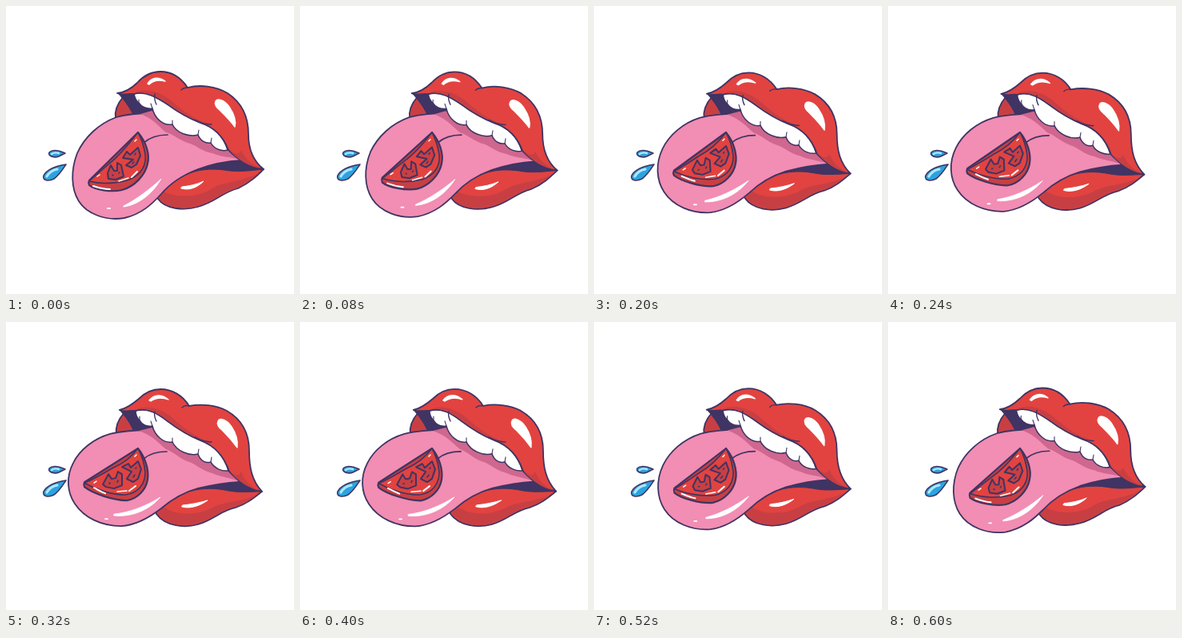
Recreate the animation shown at these times as an HTML page. Size 360 by 360 pixels, loop 0.64 s.

```html
<!DOCTYPE html>
<html lang="en">
<head>
<meta charset="utf-8">
<title>Lips and tomato</title>
<style>
html, body { margin: 0; width: 100%; height: 100%; overflow: hidden; background: #fff; }
svg { display: block; width: 100vw; height: 100vh; }
path { stroke-linecap: round; stroke-linejoin: round; }
</style>
</head>
<body>
<svg id="stage" viewBox="0 0 360 360"></svg>
<script>
const RED = '#e24340', SHADE = '#c83f43', PINK = '#f28db3', DUSK = '#cf678f';
const NAVY = '#3f3463', WHITE = '#fff', BLUE = '#2ba3e0', SKY = '#b4e6f8';
const stage = document.getElementById('stage');
const moving = [];

// A shape with two poses blends between them; with one it stays still.
function shape(fill, stroke, width, from, to) {
  const path = document.createElementNS('http://www.w3.org/2000/svg', 'path');
  path.setAttribute('fill', fill);
  path.setAttribute('stroke', stroke);
  path.setAttribute('stroke-width', width);
  path.setAttribute('d', from);
  stage.append(path);
  if (to) moving.push({ path, from, to: to.match(/[\d.]+/g).map(Number) });
}
const filled = (fill, a, b) => shape(fill, 'none', 0, a, b);
const inked = (fill, a, b, width = 1.8) => shape(fill, NAVY, width, a, b);
const line = (color, width, a, b) => shape('none', color, width, a, b);

// Lower lip
inked(SHADE,
  'M147 113C140 121 135 130 137 141L180 160L180 120Z',
  'M148 113C141 121 136 130 138 141L180 160L180 120Z');
inked(RED,
  'M180 200L190 241C199 254 222 256 240 251C262 245 270 233 290 228C305 221 314 212 322 204L235 195Z',
  'M180 200L188 240C199 255 222 258 240 253C260 247 268 236 287 232C302 227 311 219 320 212L235 197Z');
filled(SHADE,
  'M191 240C200 253 222 255 240 250C262 244 270 232 290 227C302 221 308 216 314 210C290 221 271 219 256 229C240 239 213 240 197 232Z',
  'M189 239C200 254 222 257 240 252C260 246 268 235 287 231C299 227 306 222 312 217C290 226 270 224 256 233C237 242 213 242 197 231Z');
shape(WHITE, WHITE, 1,
  'M219 228C229 231 239 227 247 219C239 223 229 225 220 226Z',
  'M220 231C230 234 242 230 252 223C242 226 231 228 221 229Z');

// Mouth opening
inked(NAVY,
  'M140 109L162 109L190 134L160 138C156 129 150 120 140 109Z',
  'M142 110L164 110L190 135L160 138C157 129 151 120 142 110Z', 1);
inked(NAVY,
  'M225 211L275 187L295 192L322 204C303 206 289 208 273 205C256 203 240 204 225 211Z',
  'M225 213L275 192L294 199L320 212C303 212 290 214 273 210C257 207 240 208 225 213Z', 1);

// Tongue
inked(PINK,
  'M184 134C170 134 152 135 138 139C116 147 98 164 89 184C81 205 81 228 91 244C101 260 125 269 148 265C170 260 183 247 194 235C205 222 219 212 240 204C257 198 276 194 294 193L270 170Z',
  'M184 135C165 135 146 136 130 140C109 146 92 160 84 176C75 193 76 212 86 227C98 245 120 255 144 255C163 254 181 243 194 233C207 222 222 213 240 208C257 204 276 201 292 200L270 174Z');
filled(DUSK,
  'M182 131L230 152L278 178L293 192C279 188 269 189 258 184C245 182 239 175 230 172C218 169 209 160 200 158C191 151 186 142 168 135Z',
  'M182 132L230 155L278 183L291 199C278 194 269 194 258 189C245 186 238 178 229 175C217 171 209 162 200 159C191 152 184 142 166 136Z');
line(NAVY, 1.7, 'M172 171C179 165 189 161 202 161', 'M172 171C179 165 189 162 201 162');
shape(WHITE, WHITE, 0.8,
  'M147 251C165 249 183 235 194 216C180 229 164 241 147 250Z',
  'M135 242C156 244 178 236 193 219C175 230 155 238 135 240Z');
line(WHITE, 1.8, 'M127 253L130 253', 'M124 246L127 246');

// Teeth
inked(WHITE,
  'M160 110C175 105 188 114 202 123C214 132 228 140 243 146C262 152 272 164 277 180C270 182 260 179 256 171C250 172 243 169 240 161C229 164 213 159 208 148C197 150 186 141 183 128C176 129 169 126 166 121C163 119 161 115 160 110Z',
  'M162 111C177 106 189 114 202 124C214 133 228 142 243 148C262 155 273 169 278 186C270 187 260 183 256 175C250 177 243 174 240 165C229 168 213 161 208 150C197 152 186 142 183 130C176 131 170 128 167 123C164 120 162 116 162 111Z', 1.5);
line(NAVY, 1.1,
  'M166 121L166 117M183 128L181 122M208 148L208 143M240 161L241 155M256 171L257 165',
  'M167 123L167 118M183 130L181 124M208 150L208 145M240 165L241 159M256 175L257 169');

// Upper lip
inked(RED,
  'M139 109C149 108 157 103 164 96C173 86 183 82 193 82C207 82 219 90 227 102C242 98 262 100 277 109C295 121 303 139 303 160C303 178 308 193 322 204C306 202 291 193 278 180C272 164 262 152 243 146C228 140 214 132 202 123C188 114 175 106 160 110C153 109 147 112 139 109Z',
  'M142 110C151 108 159 102 166 96C175 87 184 84 193 84C208 84 221 92 229 105C244 102 263 104 276 111C295 122 304 140 304 161C304 181 307 198 320 212C305 209 291 200 279 187C273 169 262 155 243 148C228 142 214 133 202 124C189 114 177 107 162 111C155 110 149 113 142 110Z');
filled(SHADE,
  'M158 109C174 102 190 106 205 117C220 130 238 144 257 148L255 150L243 145C228 139 214 131 202 122C188 113 174 105 158 109Z',
  'M160 110C176 103 191 107 206 118C221 131 238 146 257 150L255 152L243 147C228 141 214 132 202 123C189 113 176 106 160 110Z');
filled(SHADE,
  'M279 180C287 185 291 187 294 180C298 190 307 198 319 203C304 201 291 193 279 180Z',
  'M280 187C287 192 291 194 294 187C298 198 306 206 317 211C304 208 291 200 280 187Z');
line(NAVY, 1.4,
  'M227 102C223 102 221 103 219 105M186 110C185 115 186 119 188 123M236 142C243 146 250 148 257 148',
  'M229 105C225 104 222 105 220 107M186 112C185 116 186 120 188 124M236 144C243 148 250 150 257 150');
shape(WHITE, WHITE, 1.4,
  'M177 97C182 89 191 88 199 94C191 92 184 93 179 98Z',
  'M179 98C185 90 195 90 203 97C195 94 187 95 181 99Z');
shape(WHITE, WHITE, 1.4,
  'M262 119C264 115 273 117 279 126C285 135 288 144 286 151C281 144 275 138 268 131C263 127 260 123 262 119Z',
  'M265 124C267 119 276 122 282 131C288 140 290 149 289 157C284 150 278 143 271 136C266 132 263 128 265 124Z');

// Tomato slice
inked(SHADE,
  'M165 158C175 170 180 185 177 197C174 212 160 226 145 230C132 233 111 230 104 224C103 222 103 220 104 218Z',
  'M165 158C174 169 179 185 177 197C175 210 164 221 151 223C134 223 108 214 98 206C97 204 97 202 98 200Z', 2.2);
inked(RED,
  'M165 158C154 172 141 188 129 197C121 204 112 212 104 219C119 223 139 222 154 217C169 211 176 199 174 185C172 174 170 167 165 158Z',
  'M165 158C156 170 146 177 134 182C122 189 110 196 98 201C112 209 132 216 149 216C165 214 174 203 174 188C173 176 170 167 165 158Z', 1.6);
inked(SHADE,
  'M127 209L131 199L135 206L139 206L139 196L144 199L147 213L137 217L128 216Z',
  'M121 203L128 190L132 196L137 195L140 187L145 190L145 204L135 208L125 206Z', 2);
inked(SHADE,
  'M146 190L151 182L155 186L165 177L168 187L163 198L157 202L150 199L159 192Z',
  'M145 181L153 177L156 182L165 174L169 184L165 196L159 200L151 196L157 187Z', 2);
line(NAVY, 1.6,
  'M133 211L134 212M141 209L142 208M161 186L162 184M158 197L160 195',
  'M129 202L130 201M139 200L140 198M162 183L163 182M159 194L161 191');
line(WHITE, 2,
  'M109 225C115 227 122 229 130 229M157 214L164 207',
  'M110 207C114 209 119 212 124 214M154 211L162 205');
line(WHITE, 1.5,
  'M114 213L117 211M161 169L163 167M141 219L153 215',
  'M110 201L113 199M161 168L163 166M139 212L151 211');

// Drops
inked(BLUE, 'M74 184C67 181 58 179 54 183C52 188 61 190 66 188Z', null, 1.6);
line(SKY, 2.4, 'M57 185C60 183 63 183 66 184');
inked(BLUE, 'M75 198C63 200 51 204 47 212C45 219 54 219 60 216C67 211 71 204 75 198Z', null, 1.6);
line(SKY, 3.2, 'M51 213C54 208 59 205 64 204');

function draw() {
  const time = Math.floor(performance.now() % 640 / 40) * 40;
  const bend = Math.sin(Math.PI * time / 695) ** 1.6;
  for (const { path, from, to } of moving) {
    let i = 0;
    path.setAttribute('d', from.replace(/[\d.]+/g, n => (+n + (to[i++] - n) * bend).toFixed(2)));
  }
  requestAnimationFrame(draw);
}
draw();
</script>
</body>
</html>
```
